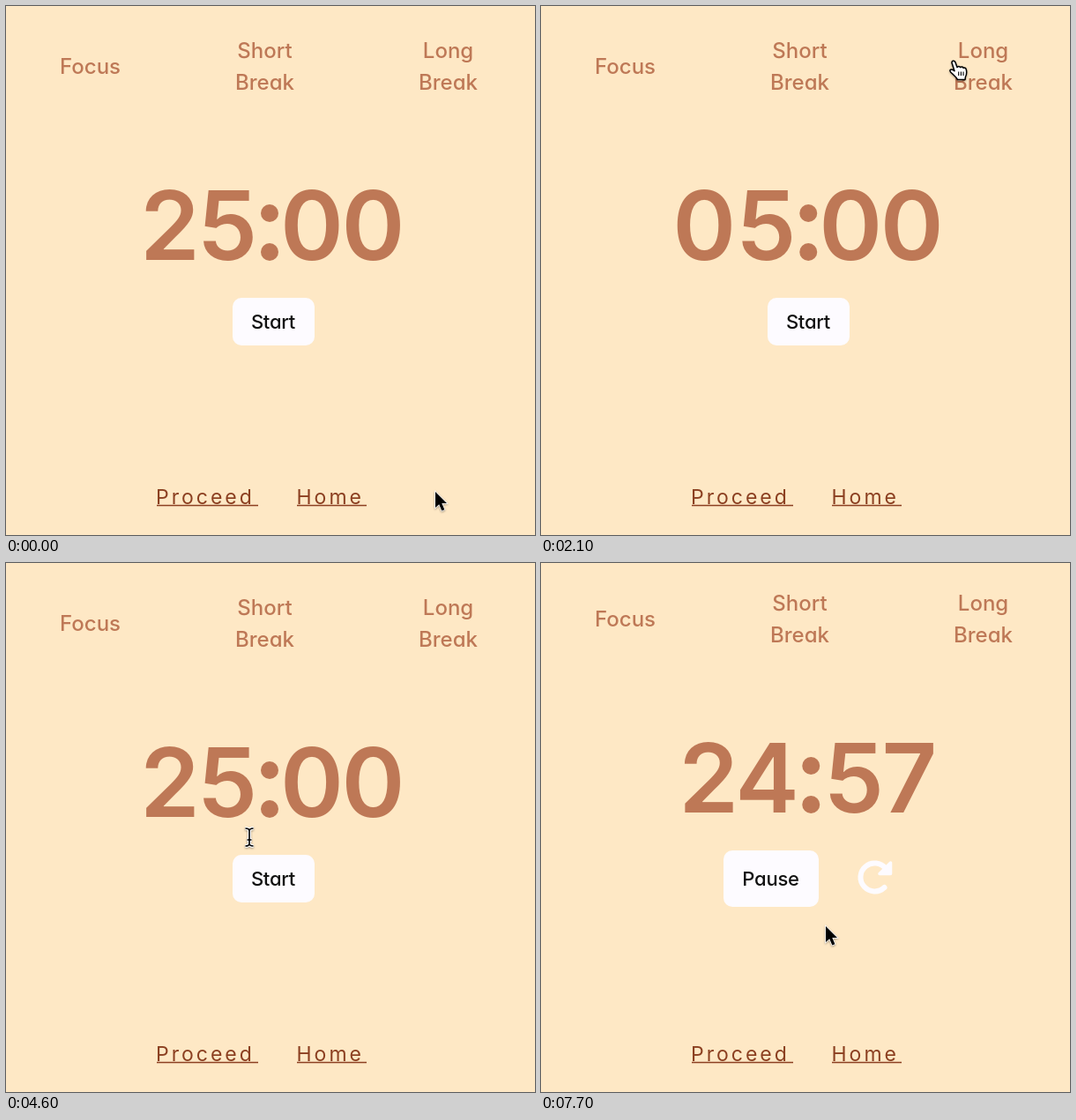
Recreate the animation shown at these times as an HTML page. Size 600 by 600 pixels, loop 8 s.

```html
<!DOCTYPE html>
<html lang="en">
<head>
<meta charset="utf-8">
<title>Focus timer</title>
<style>
  html, body { margin: 0; width: 100%; height: 100%; overflow: hidden; background: #fee8c5; }
  svg { display: block; width: 100vw; height: 100vh; }
  text { font-family: Inter, "Open Sans", sans-serif; font-feature-settings: "cv11"; text-anchor: middle; }
  .tabs { font-size: 24px; font-weight: 460; fill: #be7856; }
  .clock { font-size: 109px; font-weight: 640; fill: #be7856; }
  .button { font-size: 22px; font-weight: 460; fill: #111; letter-spacing: -.25px; }
  .links { font-size: 23px; font-weight: 430; fill: #8b3f20; }
  .links text { text-anchor: start; letter-spacing: 3px; }
  .box { fill: #fdfbff; }
  .cursor { filter: drop-shadow(0 1px 1px rgba(0, 0, 0, .35)); }
</style>
</head>
<body>
<svg viewBox="0 0 600 600">
  <g id="panel">
    <g class="tabs">
      <text x="95.5" y="77">Focus</text>
      <text x="293.5" y="59">Short</text>
      <text x="293.5" y="95">Break</text>
      <text x="501.5" y="59">Long</text>
      <text x="501.5" y="95">Break</text>
    </g>
    <g class="clock">
      <text id="digits" y="288"></text>
      <g id="colon"><circle cy="235" r="10"/><circle cy="279" r="10"/></g>
    </g>
  </g>
  <g id="idle" class="button">
    <rect class="box" x="257" y="331" width="93" height="54" rx="10"/>
    <text x="303" y="366">Start</text>
  </g>
  <g id="running" class="button">
    <rect class="box" x="207" y="326" width="108" height="64" rx="10"/>
    <text x="260.5" y="366">Pause</text>
    <path d="M391 346.500A16 16 0 1 0 389.500 368" fill="none" stroke="#fdfbff" stroke-width="6" stroke-linecap="round"/>
    <path d="M396.500 340V352.500H384Z" fill="#fdfbff" stroke="#fdfbff" stroke-width="3.500" stroke-linejoin="round"/>
  </g>
  <g class="links">
    <text x="170" y="565">Proceed</text>
    <text x="329.500" y="565">Home</text>
    <path d="M171 566.500H286M330 566.500H409" stroke="#8b3f20" stroke-width="1.400"/>
  </g>
  <g id="cursor" class="cursor">
    <path id="arrow" d="M0 0V18L4.200 14.200L7.300 21.600L10.400 20.200L7.300 13H13Z" stroke="#fff" stroke-width="1.500" paint-order="stroke"/>
    <g id="hand" transform="translate(-5 -1)" fill="#fff" stroke="#000" stroke-width="1.500" stroke-linejoin="round">
      <path d="M3 3.500C2.600 1 6 .4 7 3L9 8.600C10 7 12 7.200 12.600 8.600C13.600 7.400 15.600 7.800 16 9.200C17.400 8.600 19 9.400 19.300 11C20 14 19.700 17 18.400 19.500L18 22.500H9.500C9 20.500 6 18.500 3.500 15.800C1 13.600 .2 12 1.600 11.200C3 10.600 4.600 11.400 6 12.800Z"/>
      <path d="M10.700 13.500V18M13.400 13.500V18M16 13.500V18" stroke-width="1.100"/>
    </g>
    <g id="beam" fill="none">
      <path id="stem" d="M-4.500 -10Q0 -10 0 -7Q0 -10 4.500 -10M0 -7V7M-4.500 10Q0 10 0 7Q0 10 4.500 10M-2.500 3H2.500" stroke="#fff" stroke-width="3.500"/>
      <use href="#stem"/>
      <path d="M-4.500 -10Q0 -10 0 -7Q0 -10 4.500 -10M0 -7V7M-4.500 10Q0 10 0 7Q0 10 4.500 10M-2.500 3H2.500" stroke="#000" stroke-width="1.600"/>
    </g>
  </g>
</svg>
<script>
const LOOP = 8000, STEP = 100, RUN_AT = 5000;
const $ = id => document.getElementById(id);

// time, x, y of the pointer's hot spot
const path = [
  [0, 487, 551], [200, 478, 490], [400, 415, 270], [600, 310, 60], [700, 288, 26],
  [800, 282, 52], [1000, 283, 58], [1400, 283, 58], [1600, 312, 56], [1800, 385, 52],
  [2000, 455, 60], [2100, 468, 62], [2300, 473, 65], [2600, 475, 67], [2800, 475, 67],
  [3100, 477, 69], [3300, 390, 86], [3500, 235, 82], [3700, 125, 70], [3900, 92, 62],
  [4100, 92, 64], [4300, 150, 140], [4500, 255, 280], [4600, 276, 311], [4700, 296, 338],
  [4800, 318, 366], [5800, 318, 368], [6000, 320, 392], [6200, 323, 412], [8000, 323, 412]
];
const pointers = [
  [0, "arrow"], [800, "hand"], [1600, "arrow"], [2100, "hand"], [3200, "arrow"],
  [3700, "hand"], [4200, "arrow"], [4500, "beam"], [4700, "hand"], [5000, "arrow"]
];
const times = [
  [0, "25:00"], [1100, "05:00"], [2500, "15:00"], [4000, "25:00"],
  [5500, "24:59"], [6500, "24:58"], [7500, "24:57"]
];
// advance and ink centre of each glyph
const glyphs = {
  0: [69.5, 34.75], 1: [39, 17.25], 2: [61, 31.25], 4: [73, 36.75], 5: [70, 36.25],
  7: [57.5, 28.5], 8: [66, 33], 9: [66, 32], ":": [26.5, 13.25]
};

const pen = document.createElement("canvas").getContext("2d");
pen.font = "640 109px Inter, 'Open Sans', sans-serif";
pen.textAlign = "center";
function inkShift(char) {
  const m = pen.measureText(char);
  return (m.actualBoundingBoxRight - m.actualBoundingBoxLeft) / 2;
}

const current = (table, t) => table.filter(row => row[0] <= t).pop()[1];

function pointAt(t) {
  const i = Math.max(1, path.findIndex(p => p[0] >= t));
  const [t0, x0, y0] = path[i - 1], [t1, x1, y1] = path[i];
  const k = (t - t0) / (t1 - t0);
  return [x0 + (x1 - x0) * k, y0 + (y1 - y0) * k];
}

let shown = "";
function setClock(label) {
  if (label === shown) return;
  shown = label;
  const chars = [...label];
  let left = 303 - chars.reduce((sum, c) => sum + glyphs[c][0], 0) / 2;
  $("digits").textContent = "";
  for (const c of chars) {
    const [advance, centre] = glyphs[c];
    if (c === ":") {
      $("colon").setAttribute("transform", `translate(${left + centre} 0)`);
    } else {
      const span = document.createElementNS("http://www.w3.org/2000/svg", "tspan");
      span.textContent = c;
      span.setAttribute("x", left + centre - inkShift(c));
      $("digits").append(span);
    }
    left += advance;
  }
}

const show = (id, on) => $(id).style.display = on ? "" : "none";

function draw(now) {
  const t = Math.floor(now % LOOP / STEP) * STEP;
  const running = t >= RUN_AT;
  setClock(current(times, t));
  $("panel").setAttribute("transform", `translate(0 ${running ? -5 : 0})`);
  show("idle", !running);
  show("running", running);
  const pointer = current(pointers, t);
  for (const id of ["arrow", "hand", "beam"]) show(id, id === pointer);
  $("cursor").setAttribute("transform", `translate(${pointAt(t)})`);
}

const start = performance.now();
function tick() {
  draw(performance.now() - start);
  requestAnimationFrame(tick);
}
tick();
</script>
</body>
</html>
```
